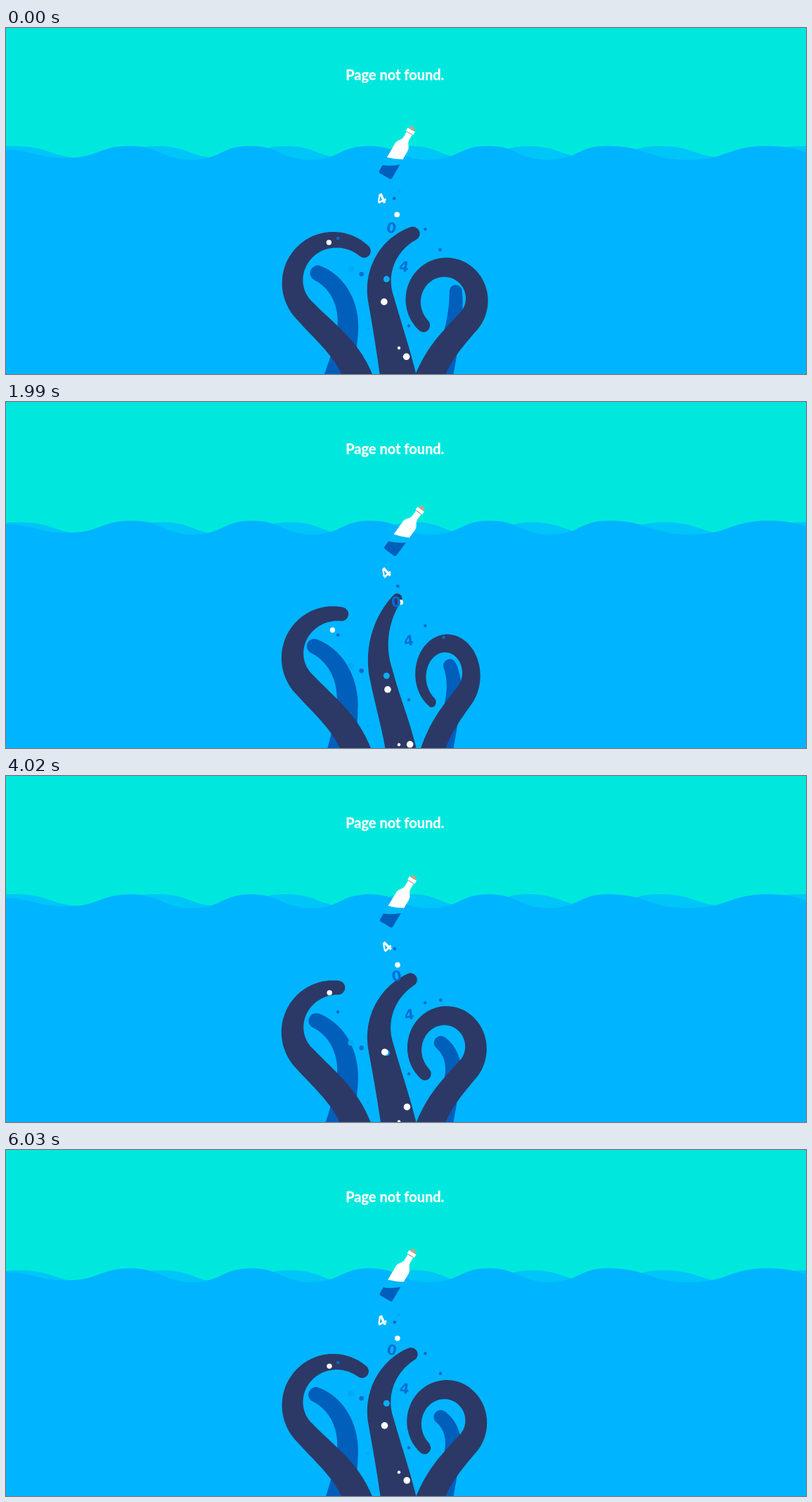
Write an HTML page that moves like this. It is 1138 px wide and 492 px high and loops after 6.13 s.

```html
<!DOCTYPE html>
<html lang="en">
<head>
<meta charset="utf-8">
<title>Page not found</title>
<style>
  html, body { margin: 0; width: 100%; height: 100%; overflow: hidden; background: #00e8de; }
  svg { display: block; width: 1138px; height: 492px; }
  text { text-anchor: middle; }
  .title { font: 700 20px Lato, "Open Sans", sans-serif; fill: #fff; stroke: #fff; stroke-width: .3px; }
  .digit { font: 700 20px "DejaVu Sans", sans-serif; fill: #006fd6; }
  .navy { fill: #2c3966; }
  .blue { fill: #005fbb; }
  .dot { fill: #0a6cc8; }
  .white { fill: #fff; }
  .cyan { fill: #0cadf4; }
  .faint { fill: #00a9f5; }
</style>
</head>
<body>
<svg viewBox="0 0 1138 492">
  <rect width="1138" height="492" fill="#00e8de"/>
  <text class="title" x="553.3" y="74">Page not found.</text>
  <path id="backWave" fill="#00c5f8"/>
  <path id="frontWave" fill="#00b4ff"/>

  <g id="bottle">
    <path fill="#00b8fb" d="M-10.5-11.5V-25L11-34V-24.8Z"/>
    <path class="blue" d="M-10.5-12Q0-16 10.5-25V-3Q10.5 0 7.5 0H-7.5Q-10.5 0-10.5-3Z"/>
    <path class="white" d="M-10.5-24.5V-47C-10.5-54-4.5-55-4.5-62V-71H-6V-76H6V-71H4.5V-62C4.5-55 10.5-54 10.5-47V-33.5Q1-28-10.5-24.5Z"/>
    <path fill="#d0a078" d="M-3.7-76V-79.5Q-3.7-80.5-2.7-80.5H2.7Q3.7-80.5 3.7-79.5V-76Z"/>
    <path stroke="#b08a78" d="M-4.2-70.5H4.2"/>
  </g>

  <g id="arms"></g>
  <circle class="dot" cx="573" cy="423.5" r="2.2"/>
  <g id="slow"></g>
  <g id="sway"></g>
  <g id="digits"></g>
</svg>
<script>
const LOOP = 6130, FRAMES = 52, STEP = LOOP / FRAMES;
const NS = 'http://www.w3.org/2000/svg';
const RAD = Math.PI / 180;
const $ = id => document.getElementById(id);
const mix = (a, b, k) => a + (b - a) * k;
const wave = (t, peak, period) => Math.cos(2 * Math.PI * (t - peak) / period);

function add(parent, tag, attrs) {
  const el = document.createElementNS(NS, tag);
  for (const k in attrs) el.setAttribute(k, attrs[k]);
  return $(parent).appendChild(el);
}

function place(el, x, y, angle = 0) {
  el.setAttribute('transform', `translate(${x} ${y}) rotate(${angle})`);
}

// Smooth swell through the crests; each trough mirrors its neighbours about the sea level.
function seaPath(crests, top, first = top) {
  const level = 178.2;
  let x = crests[0], y = first, d = `M${x} 520V${y}`;
  const curveTo = (nx, ny) => {
    const m = (x + nx) / 2;
    d += `C${m} ${y} ${m} ${ny} ${nx} ${ny}`;
    [x, y] = [nx, ny];
  };
  for (const next of crests.slice(1)) {
    curveTo(mix(x, next, 0.51), 2 * level - (y + top) / 2);
    curveTo(next, top);
  }
  return d + 'V520Z';
}

$('backWave').setAttribute('d', seaPath([-190, 15, 218, 401, 578, 745, 933, 1133, 1330], 169.5));
$('frontWave').setAttribute('d', seaPath([-6, 178, 349, 517, 687, 856, 1084, 1310], 168.4, 173.5));

// An arm is a stem from root to knee, then a curl that turns steadily from the knee's heading.
// ramp shifts the bend towards the tip; width lists the half widths at root, knee and tip.
function armPath({ root, rise, knee, heading, length, turn, ramp, width }) {
  const left = [], right = [];
  const edge = (x, y, h, r) => {
    const dx = Math.sin(h) * r, dy = -Math.cos(h) * r;
    left.push(`${(x + dx).toFixed(2)} ${(y + dy).toFixed(2)}`);
    right.unshift(`${(x - dx).toFixed(2)} ${(y - dy).toFixed(2)}`);
  };

  const reach = 0.4 * Math.hypot(knee[0] - root[0], knee[1] - root[1]);
  const out = [Math.cos(rise * RAD), Math.sin(rise * RAD)];
  const into = [Math.cos(heading * RAD), Math.sin(heading * RAD)];
  for (let u = 0; u < 1; u += 1 / 16) {
    const v = 1 - u;
    const [px, py, dx, dy] = [0, 1].map(i => {
      const a = root[i], b = a + out[i] * reach, d = knee[i], c = d - into[i] * reach;
      return [v * v * v * a + 3 * u * v * v * b + 3 * u * u * v * c + u * u * u * d,
        v * v * (b - a) + 2 * u * v * (c - b) + u * u * (d - c)];
    }).reduce((p, q) => [p[0], q[0], p[1], q[1]]);
    edge(px, py, Math.atan2(dy, dx), mix(width[0], width[1], u));
  }

  const steps = 48;
  const angle = u => (heading + turn * ((1 - ramp) * u + ramp * u * u)) * RAD;
  let [x, y] = knee;
  for (let i = 0; i <= steps; i++) {
    const u = i / steps, mid = angle(u + 0.5 / steps);
    edge(x, y, angle(u), mix(width[1], width[2], u));
    x += Math.cos(mid) * length / steps;
    y += Math.sin(mid) * length / steps;
  }
  const r = width[2];
  return `M${left.join('L')}A${r} ${r} 0 0 1 ${right.join('L')}Z`;
}

const arms = [
  { cls: 'blue', key: 'swell', shape: k => ({
    root: [mix(465, 480, k), 505], rise: mix(-70, -83, k), knee: [485, mix(437, 440, k)],
    heading: mix(-78, -88, k), length: mix(102, 115, k), turn: mix(-78, -70, k), ramp: 0.3,
    width: [20, 15.5, mix(11.5, 10, k)] }) },
  { cls: 'blue', key: 'unfurl', shape: k => ({
    root: [620, 505], rise: -78, knee: [635, 432],
    heading: -79, length: 58, turn: mix(-69, -14, k), ramp: 0.3,
    width: [14, 11.7, mix(10, 9, k)] }) },
  { cls: 'navy', key: 'drift', shape: k => ({
    root: [mix(506, 503, k), 510], rise: -108, knee: [423, 400],
    heading: -133, length: mix(184, 136, k), turn: mix(176, 131, k), ramp: -0.05,
    width: [20.5, mix(16.5, 18.5, k), mix(9.5, 10, k)] }) },
  { cls: 'navy', key: 'bob', shape: k => ({
    root: [mix(559, 564, k), 505], rise: -101, knee: [533, 384],
    heading: -103, length: 111, turn: mix(84, 51, k), ramp: 0,
    width: [mix(26.8, 22, k), mix(18.7, 17, k), mix(10.4, 7, k)] }) },
  { cls: 'navy', key: 'bob', squeeze: k => 1 - 0.2 * k, shape: k => ({
    root: [596, 510], rise: -70, knee: [659, 417],
    heading: -47, length: mix(220, 218, k), turn: mix(-268, -278, k), ramp: -0.04,
    width: [20.5, 17.5, mix(10, 7.5, k)] }) }
];
for (const arm of arms) arm.el = add('arms', 'path', { class: arm.cls });

const bubble = (group, cls, cx, cy, r) => add(group, 'circle', { class: cls, cx, cy, r });
bubble('slow', 'cyan', 541.3, 356, 4.5);
bubble('slow', 'dot', 596.3, 285, 2.2);
bubble('slow', 'dot', 505.7, 349, 3.2);
bubble('slow', 'dot', 472.2, 298, 2.3);
bubble('slow', 'white', 559, 454, 2.2);
bubble('slow', 'faint', 490.5, 342, 4.2);
bubble('slow', 'faint', 515, 427, 2);
bubble('slow', 'faint', 559.5, 230, 2);
bubble('sway', 'white', 555.3, 262, 3.8);
bubble('sway', 'dot', 551.3, 239, 2.3);
bubble('sway', 'white', 458.5, 301.5, 3.7);
bubble('sway', 'white', 537, 386, 4.8);
bubble('sway', 'white', 568.7, 464, 4.8);
bubble('sway', 'dot', 616.6, 312, 2.3);

function digit(char, x, y, tilt, swing, cls = '') {
  const el = add('digits', 'text', { class: 'digit ' + cls, y: 7.2 });
  el.textContent = char;
  return k => place(el, x + 8.8 * k, y, tilt - swing * k);
}
const digits = [
  digit('4', 533.5, 243, -24, 24),
  digit('0', 548, 284, 10, 21),
  digit('4', 566, 339, 9, 20)
];
$('digits').firstChild.style.fill = '#fff';

function draw(t) {
  const front = wave(t, 1200, 3800), back = -wave(t, 0, 4000);
  const pose = {
    bob: (1 + wave(t, 2150, 5750)) / 2,
    drift: 0.48 + 0.52 * wave(t, 3140, 7480),
    swell: (1 + front) / 2,
    unfurl: (1 + wave(t, 0, 10050)) / 2
  };
  const { bob, drift } = pose;
  place($('frontWave'), 4.2 * front, 1.5 * front);
  place($('backWave'), 3 * back, 1.6 * back);
  place($('bottle'), 537.6 + 8 * bob, 210 + 4 * bob, 28.8 + 7.3 * bob);
  place($('sway'), 6 * bob, 23 * bob);
  place($('slow'), 0, 43 * drift);
  for (const move of digits) move(drift);
  for (const { el, key, shape, squeeze } of arms) {
    const k = pose[key];
    el.setAttribute('d', armPath(shape(k)));
    if (squeeze) el.setAttribute('transform', `translate(626 0) scale(${squeeze(k)} 1) translate(-626 0)`);
  }
}

const start = performance.now();
let shown = -1;
function tick() {
  const t = (performance.now() - start) % LOOP;
  const frame = Math.min(Math.floor((t + 20) / STEP), FRAMES - 1);
  if (frame !== shown) {
    shown = frame;
    draw(Math.max(0, frame * STEP - 20));
  }
  requestAnimationFrame(tick);
}
tick();
</script>
</body>
</html>
```
